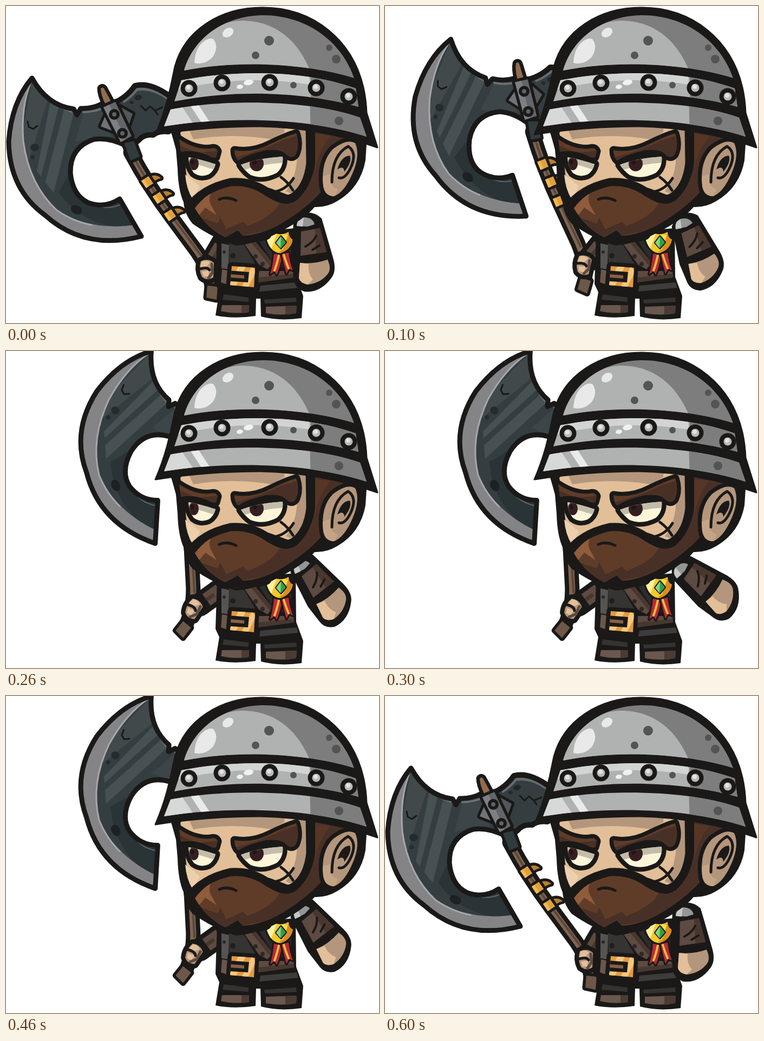
Recreate the animation shown at these times as an HTML page with a canvas. Size 689 px wide and 585 px high, loop 700 ms.

```html
<!DOCTYPE html>
<html lang="en">
<head>
<meta charset="utf-8">
<title>Axe warrior</title>
<style>
html, body { margin: 0; width: 100%; height: 100%; overflow: hidden; background: #fff; }
canvas { display: block; }
</style>
</head>
<body>
<canvas id="stage" width="689" height="585"></canvas>
<script>
const g = document.getElementById('stage').getContext('2d');
const INK = '#1a1918', SKIN = '#e2bf98', TAN = '#b4967c';
const STEEL = '#b0b2b1', DARK_STEEL = '#7d7d7d', BROWN = '#5f3c28', DEEP = '#493026';
const LEATHER = '#5d4a41', GOLD = '#e0a03a';

// The outline lies under the fill, so only its outer half shows
function shape(d, color, outline) {
  const p = new Path2D(d);
  if (outline) {
    g.lineWidth = outline;
    g.strokeStyle = INK;
    g.stroke(p);
  }
  g.fillStyle = color;
  g.fill(p);
}

function line(d, width, color = INK) {
  g.lineWidth = width;
  g.strokeStyle = color;
  g.stroke(new Path2D(d));
}

function oval(x, y, rx, ry, color, turn = 0) {
  g.beginPath();
  g.ellipse(x, y, rx, ry, turn, 0, Math.PI * 2);
  g.fillStyle = color;
  g.fill();
}

const dot = (x, y, r, color) => oval(x, y, r, r, color);

function inside(d, draw) {
  g.save();
  g.clip(new Path2D(d));
  draw();
  g.restore();
}

// Rotates around (px, py), then shifts by (dx, dy)
function moved(px, py, deg, dx, dy, draw) {
  g.save();
  g.translate(px + dx, py + dy);
  g.rotate(deg * Math.PI / 180);
  g.translate(-px, -py);
  draw();
  g.restore();
}

function axeHead() {
  const blade = 'M48 133 Q76 184 125 190 L131 201 L138 189 Q160 190 178 180 L222 258 ' +
    'Q190 242 163 246 Q118 260 119 308 Q123 350 152 363 Q183 374 210 356 ' +
    'L250 425 Q145 452 72 386 Q6 338 5 250 Q10 178 48 133Z';
  const rear = 'M196 180 Q222 170 238 147 Q266 140 302 166 L345 205 L300 232 ' +
    'Q282 230 272 238 Q255 236 245 248 L228 262Z';
  shape(rear, '#343d40');
  inside(rear, () => {
    line('M218 176 Q230 168 242 154 Q272 150 300 172', 5, '#646b6e');
    oval(244, 169, 7, 5, '#22292b', -.3);
    oval(232, 178, 4, 3, '#22292b');
    line('M249 184 L258 193 L266 185 L275 193 L289 187 M275 193 L280 200', 3);
  });
  line(rear, 10);

  shape(blade, '#848486');
  inside(blade, () => {
    const core = 'M44 140 Q27 185 32 250 Q43 330 94 377 Q158 418 250 402 L270 300 L190 160 L120 190Z';
    shape(core, '#343e41');
    inside(core, () => {
      shape('M50 130 L80 165 L42 285 L20 285Z', '#41494b');
      shape('M84 165 L128 185 L88 345 L57 305Z', '#475053');
      shape('M100 176 L110 180 L70 335 L62 325Z', '#343e41');
      shape('M146 185 L176 180 L195 240 L128 250Z', '#3c4548');
      shape('M98 345 L125 290 L146 362 L240 360 L250 410 Q150 415 98 345Z', '#2a3336');
    });
    line('M46 140 Q27 187 32 250 Q43 330 94 377 Q125 398 158 404', 3, '#a6a7aa');
    line('M57 150 Q84 184 124 196', 3, '#697174');
    line('M143 196 Q165 195 180 188', 4, '#697174');
    line('M137 268 Q103 309 139 353 Q177 383 215 365', 2, '#59636a');
    oval(53, 261, 8, 7, '#252c2e');
    dot(49, 279, 4, '#252c2e');
    oval(130, 376, 11, 8, '#1c2224', .5);
    line('M40 213 L42 223 L50 227 L58 221', 3);
  });
  line(blade, 9);
}

function axeShaft() {
  const stick = 'M230 270 Q265 335 306 390 L354 455 Q378 490 382 530';
  line(stick, 27);
  line(stick, 11, '#806551');
  line('M240 287 Q273 346 312 396 L360 460', 4, '#5a473c');
  shape('M372 516 L391 518 L389 542 L370 538Z', '#6d5748', 11);

  [[261, 325], [282, 354], [303, 386]].forEach(([x, y]) => {
    moved(x, y, -34, 0, 0, () => {
      shape(`M${x + 7} ${y - 6} Q${x + 22} ${y - 5} ${x + 25} ${y + 8} Q${x + 16} ${y + 4} ${x + 7} ${y + 7}Z`, '#b87d31', 10);
      shape(`M${x - 8} ${y - 8} h16 v16 h-16Z`, GOLD, 10);
      shape(`M${x - 8} ${y - 8} h6 v16 h-6Z`, '#f0b957');
    });
  });

  shape('M218 253 L236 249 L247 278 L230 285Z', '#303b3d', 11);
  shape('M175 152 Q179 148 182 154 L194 176 L184 182 Q175 164 175 152Z', '#936c4e', 13);
  shape('M189 190 L175 222 L206 234Z', '#707377', 10);
  shape('M205 183 L234 199 L225 225Z', '#53575b', 10);
  shape('M180 187 L202 177 L232 240 L212 251Z', '#62666a', 11);
  shape('M180 187 L191 182 L221 246 L212 251Z', '#7c8084');
  [[200, 200], [215, 235]].forEach(([x, y]) => {
    dot(x, y, 10, INK);
    dot(x, y, 4, '#5d6266');
  });
}

const SHOULDER = [400, 438];
const HANDS = [
  { x: 372, y: 486, turn: 0 },
  { x: 368, y: 478, turn: 10 },
  { x: 347, y: 476, turn: 32 }
];

function leftArm({ x, y, turn }) {
  const [sx, sy] = SHOULDER;
  const along = t => `${sx + (x - sx) * t} ${sy + (y - sy) * t}`;
  line(`M${along(0)} L${along(.8)}`, 43);
  g.lineCap = 'butt';
  line(`M${along(.1)} L${along(.56)}`, 26, LEATHER);
  line(`M${along(.3)} L${along(.56)}`, 7, '#46372f');
  g.lineCap = 'round';
  g.save();
  g.translate(x, y);
  g.rotate(turn * Math.PI / 180);
  shape('M-12 -15 Q2 -21 12 -12 L11 15 Q0 22 -10 14 Q-17 0 -12 -15Z', TAN, 16);
  shape('M-11 -14 Q-3 -19 5 -13 L-2 -4 L-13 -3Z M-10 4 L3 2 L2 13 L-7 13Z', SKIN);
  line('M-13 -1 Q0 -5 4 1', 5);
  line('M2 16 L10 5 M8 -10 L9 2', 5, LEATHER);
  g.restore();
}

function body() {
  shape('M390 422 L535 410 L536 500 L549 535 L546 576 Q505 582 471 573 L470 540 L462 540 L461 572 Q420 578 387 571 L394 528 L387 513Z', INK);
  shape('M398 438 L412 441 L411 486 L398 484Z', '#555452');
  shape('M412 436 L440 441 L466 485 L413 484Z', '#353433');
  dot(419, 461, 5, '#201f1f');
  dot(403, 454, 3, '#2a2929');
  shape('M441 440 L461 435 L493 474 L483 486 L467 477Z', LEATHER);
  shape('M453 437 L461 435 L493 474 L488 480Z', '#49372f');
  dot(461, 462, 4, '#302823');
  dot(474, 476, 4, '#302823');
  shape('M468 435 L527 422 L526 485 L497 479Z', '#2d2c2c');
  shape('M399 486 L414 489 L414 516 L397 510Z', '#6b564a');
  shape('M465 489 L531 489 L532 501 L466 510Z', LEATHER);
  shape('M466 501 L532 494 L532 501 L466 510Z', '#48372f');
  shape('M470 516 L537 510 L540 520 L468 527Z', '#3d3c3b');

  const buckle = 'M417 480 L460 483 L458 519 L414 515Z';
  shape(buckle, '#e39a43', 15);
  inside(buckle, () => {
    shape('M432 475 L446 475 L423 520 L410 520Z M454 480 L462 490 L445 523 L434 521Z', '#f4c77b');
    shape('M412 488 L449 491 L447 510 L412 508Z', INK);
    shape('M414 495 L440 497 L440 503 L414 501Z', '#876147');
  });

  shape('M402 532 L448 538 L448 546 L400 542Z', '#343332');
  shape('M399 552 L449 552 L449 565 Q422 569 397 563Z', '#6a574d');
  shape('M435 552 L449 552 L449 565 L435 566Z', '#4a3b34');
  shape('M477 542 L536 538 L537 546 L478 549Z', '#343332');
  shape('M480 555 L537 553 L536 567 Q509 572 480 567Z', '#6a574d');
  shape('M516 554 L537 553 L536 567 L516 569Z', '#4a3b34');
}

function medal() {
  shape('M495 457 L510 459 Q507 481 500 496 L496 489 L488 495 Q493 478 495 457Z', '#b92b39', 6);
  shape('M509 458 L522 455 Q524 474 530 488 L523 485 L518 494 Q513 476 509 458Z', '#b92b39', 6);
  line('M504 460 Q500 478 496 488 M513 459 Q518 475 522 484', 4, '#f0bf35');
  const plate = 'M482 432 Q491 429 492 418 Q508 425 522 417 Q522 428 530 431 Q526 450 507 456 Q489 455 482 432Z';
  shape(plate, '#f5c92b', 7);
  inside(plate, () => {
    shape('M481 420 L500 420 L489 451 L479 440Z', '#fff0a0');
    shape('M517 420 L531 423 L526 452 L505 455Z', '#dc8c21');
    shape('M508 421 L521 422 L512 449 L506 452Z', '#ffdc45');
  });
  shape('M508 425 L517 436 L508 447 L499 437Z', '#2da144', 4);
  shape('M508 425 L507 447 L499 437Z', '#8bd084');
}

function rightArm() {
  shape('M548 382 Q568 378 583 392 L588 409 L603 461 Q612 488 601 502 Q580 530 551 527 Q534 521 532 506 L527 470 L531 399Z', INK);
  shape('M537 406 Q538 391 552 390 Q567 391 570 403 L557 407Z', '#949695');
  shape('M537 406 Q538 392 550 390 L548 407Z', '#c6c7c7');
  shape('M545 416 L580 410 L592 454 L544 461Z', LEATHER);
  shape('M571 412 L580 410 L592 454 L573 457Z', '#49372f');
  line('M553 444 Q568 436 573 424 M566 450 L579 442', 4);
  shape('M543 474 Q568 477 594 468 Q602 485 594 495 Q580 512 557 514 Q543 511 541 502Z', TAN);
  shape('M543 474 L559 476 Q557 493 567 505 L557 514 Q543 511 541 502Z', SKIN);
}

function face() {
  shape('M310 200 L304 230 Q310 250 314 265 L317 300 Q318 340 328 362 Q330 385 345 402 Q385 430 425 442 Q470 438 515 412 Q552 392 570 371 Q592 372 612 360 Q655 335 664 285 L667 240 L640 200Z', INK);
  shape('M322 234 L340 215 L555 215 L556 295 Q543 345 525 350 L490 337 Q420 312 345 357 Q333 330 331 285Z', SKIN);
  shape('M332 215 L515 215 L514 233 L491 246 Q418 234 346 246Z', TAN);
  shape('M537 215 L556 215 L556 295 Q548 332 529 347 L517 342 Q538 315 538 270Z', TAN);
  shape('M331 311 L343 320 L358 333 L345 357 Q333 338 331 311Z', '#ecd0ae');

  const beard = 'M349 373 Q372 342 410 332 Q455 328 485 352 Q515 375 538 358 Q566 330 571 290 L571 215 L640 225 L636 248 Q597 258 588 295 Q580 325 582 343 Q550 378 500 406 Q466 423 438 424 L428 414 L405 427 Q370 410 349 373Z';
  shape(beard, BROWN);
  inside(beard, () => {
    shape('M571 215 L640 215 L640 245 L590 350 L500 412 L400 430 L361 391 L391 401 L396 390 L407 412 L438 398 L446 406 Q498 386 507 360 Q560 365 571 290Z', DEEP);
    shape('M345 375 L386 334 Q371 351 378 366 L389 386 L368 372 L357 386Z', '#8f5c3c');
    shape('M571 236 L599 240 Q578 265 571 302Z', '#563625');
  });
  line('M338 371 Q362 337 415 325 Q454 322 485 345 Q512 362 530 353 Q557 335 562 290 L561 225', 15);
  line('M394 357 Q408 350 425 359', 5);
  shape('M394 357 Q410 347 426 360 Q411 356 394 357Z', INK);

  const ear = 'M586 332 Q581 287 604 264 Q630 244 645 253 Q655 275 640 309 Q625 344 606 351 Q589 351 586 332Z';
  shape(ear, TAN, 15);
  inside(ear, () => shape('M583 315 L599 310 Q597 335 613 338 L604 358 L584 350Z', '#c5a486'));
  line('M602 325 Q602 275 632 259 Q650 271 636 300 Q626 320 615 317', 5);
  shape('M612 302 Q619 277 635 276 Q640 287 625 306 Q624 293 612 302Z', INK);
}

function eye(d, lid, px, py, rx, ry) {
  shape(d, '#fcf5d9', 17);
  inside(d, () => {
    shape(lid, '#c3bca9');
    oval(px, py, rx, ry, '#351e20');
    oval(px - rx * .3, py - ry * .25, rx * .35, ry * .35, '#241416');
  });
}

function eyes() {
  eye('M337 279 Q360 283 387 292 Q384 305 374 311 Q359 317 347 308 Q338 297 337 279Z',
    'M330 270 L393 282 L391 304 L336 287Z', 347, 291, 9, 12);
  eye('M434 293 Q465 281 511 278 Q513 297 500 308 Q475 321 452 312 Q441 304 434 293Z',
    'M425 275 L518 270 L515 289 Q475 291 434 304Z', 463, 291, 13, 14);
  const left = 'M320 246 Q350 266 378 263 Q388 260 391 268 L388 279 Q382 281 372 275 Q346 264 323 269Z';
  const right = 'M422 266 Q455 272 490 254 Q518 240 536 235 Q543 257 535 274 Q527 284 516 272 Q506 263 480 266 Q445 274 429 285 Q422 279 422 266Z';
  shape(left, BROWN, 15);
  shape(right, BROWN, 15);
  inside(left, () => shape('M316 255 L353 271 L391 267 L397 290 L360 285 L318 282Z', DEEP));
  inside(right, () => shape('M418 281 Q475 266 510 248 L536 240 L546 270 L528 287 L508 277 L430 292Z', DEEP));
  line('M508 316 Q521 325 530 340 M531 318 Q519 337 500 342', 5);
}

function shadedPlate(d, x) {
  shape(d, STEEL);
  inside(d, () => shape(`M${x} 110 L700 110 L700 250 L${x + 3} 250Z`, DARK_STEEL));
}

function helmet() {
  shape('M276 237 Q288 210 297 178 L304 150 L312 112 C330 45 395 3 474 3 C570 3 640 65 660 150 Q665 172 666 197 L686 261 Q580 224 470 222 Q370 222 276 237Z', INK, 3);
  const dome = 'M329 119 C345 62 400 18 474 17 C560 17 622 70 643 133 C560 108 440 98 329 119Z';
  shape(dome, DARK_STEEL);
  inside(dome, () => {
    shape('M325 130 C340 70 385 27 435 27 C500 27 540 66 562 120Z', STEEL);
    shape('M383 61 Q394 75 382 94 Q367 110 348 105 Q349 82 361 69 Q374 57 383 61Z', '#e8e9e8');
    oval(410, 49, 11, 8, '#e8e9e8', -.6);
    [[486, 64, 9], [461, 91, 7], [597, 77, 6], [610, 98, 8]].forEach(([x, y, r]) => dot(x, y, r, '#545454'));
  });

  const band = 'M324 137 C420 118 550 117 646 152 L651 186 C560 160 430 152 311 176Z';
  shadedPlate(band, 562);
  inside(band, () => {
    shape('M315 130 L560 115 L561 145 C480 132 400 135 316 154Z', '#d2d4d3');
    oval(432, 149, 6, 4, '#f0f1f0', -.2);
    oval(448, 141, 9, 5, '#f0f1f0', -.2);
    dot(531, 146, 6, '#545454');
  });
  [[338, 152], [399, 142], [487, 141], [573, 151], [633, 167]].forEach(([x, y]) => {
    dot(x, y, 15.5, INK);
    dot(x, y, 7.5, '#b9bbba');
    dot(x - 1, y - 2, 4, '#e2e3e2');
  });

  const brim = 'M304 191 C400 172 560 172 654 206 L666 241 C560 206 410 203 292 222Z';
  shadedPlate(brim, 560);
  inside(brim, () => {
    shape('M290 190 L324 184 L348 220 L285 226Z', '#d7d9d8');
    shape('M338 180 L354 180 L379 218 L363 218Z', '#e9eae9');
    dot(615, 212, 8, '#545454');
  });
}

const POSES = [0, 1, 2, 3, 2, 1, 0];
const AXE = [[0, 0, 0], [11.6, 10, -36], [33.5, 23, -67]];
const ARM = [[0, 0, 0], [-15, -2, 2], [-30, -8, -2], [-46, -7, 4]];

function draw(ms) {
  const pose = POSES[Math.floor(ms / 100) % POSES.length];
  const grip = Math.min(pose, 2);
  g.fillStyle = '#fff';
  g.fillRect(0, 0, 689, 585);
  g.lineJoin = 'round';
  g.lineCap = 'round';
  moved(256, 428, ...AXE[grip], () => {
    axeHead();
    axeShaft();
  });
  leftArm(HANDS[grip]);
  body();
  medal();
  moved(553, 400, ...ARM[pose], rightArm);
  face();
  eyes();
  helmet();
}

const start = performance.now();
function tick() {
  draw(performance.now() - start);
  requestAnimationFrame(tick);
}
tick();
</script>
</body>
</html>
```
